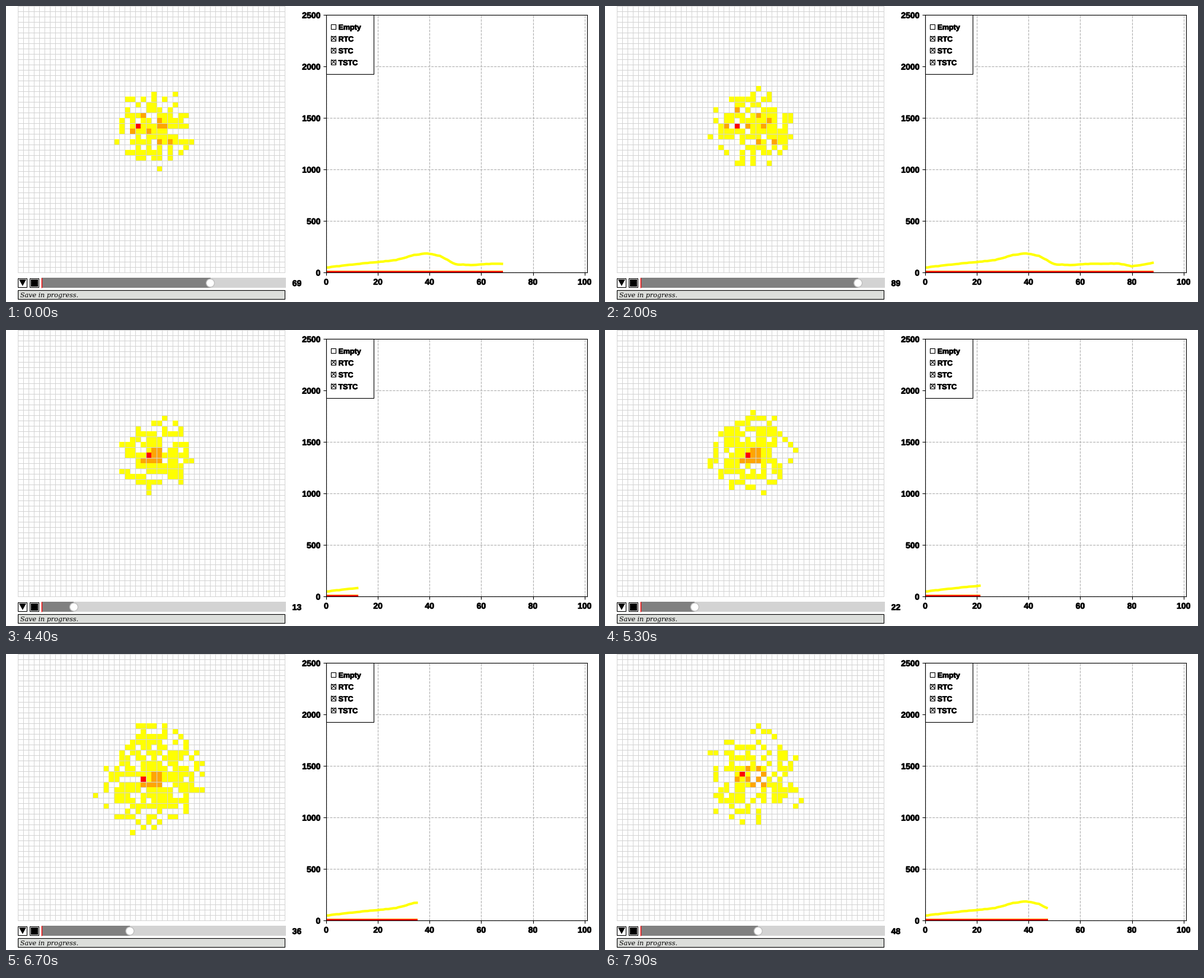
A matplotlib script that plays this animation: 1000 px wide and 500 px high, repeating every 8 s.

```python
import random

import matplotlib.pyplot as plt
import numpy as np
from matplotlib.animation import FuncAnimation
from matplotlib.patches import Circle, Polygon, Rectangle
from matplotlib.patheffects import withStroke

W, H, DPI = 1000, 500, 100
FRAMES, STEPS, FIRST = 80, 100, 69
GRID, CELL = 50, 9
PX = 72 / DPI

WHITE, LINE = (255, 255, 255), (211, 211, 211)
YELLOW, ORANGE, RED = (255, 255, 0), (255, 165, 0), (255, 0, 0)

# Turning points of the population: step -> cells
TREND = {0: 46, 12: 82, 27: 119, 34: 169, 39: 185, 44: 161, 50: 79,
         56: 71, 65: 84, 75: 86, 80: 58, 88: 92, 99: 104}

# Stem cells start packed around the root and drift apart
STEM_START = [(25, 22), (26, 22), (26, 23), (25, 23),
              (23, 24), (24, 24), (25, 24), (26, 24)]
STEM_END = [(22, 19), (26, 20), (28, 21), (27, 22),
            (20, 22), (24, 22), (26, 25), (29, 25)]

rng = random.Random(7)


def count_at(step):
    wobble = rng.uniform(-2, 2) if step else 2
    return round(np.interp(step, list(TREND), list(TREND.values())) + wobble)


def drift(start, end, step, begin, finish):
    t = min(max((step - begin) / (finish - begin), 0), 1)
    return tuple(round(a + (b - a) * t) for a, b in zip(start, end))


def stem_cells(step):
    return [drift(a, b, step, 30, 89) for a, b in zip(STEM_START, STEM_END)]


def root_cell(step):
    return drift((24, 23), (22, 22), step, 24, 58)


def neighbours(cell):
    c, r = cell
    return [(c + i, r + j) for i in (-1, 0, 1) for j in (-1, 0, 1) if i or j]


def grow():
    """Run the colony: cells migrate, divide and die along the trend."""
    fixed = set(stem_cells(0)) | {root_cell(0)}
    cells = {(c, r) for c in range(22, 30) for r in range(20, 26)}
    cells |= {(c, 26) for c in range(23, 31)} | {(30, 25)}
    cells -= fixed
    history = [sorted(cells)]

    for step in range(1, STEPS):
        fixed = set(stem_cells(step)) | {root_cell(step)}
        cells -= fixed
        goal = count_at(step)
        radius = 0.9 * goal ** 0.5
        middle = 23 - 2 * (step / STEPS) ** 4

        def distance(cell):
            return np.hypot(cell[0] - 25, cell[1] - middle) / radius

        def free_spot(cell):
            spots = [n for n in neighbours(cell) if n not in cells | fixed
                     and rng.random() > distance(n) ** 4]
            return rng.choice(spots) if spots else None

        for cell in rng.sample(sorted(cells), len(cells)):
            spot = free_spot(cell) if rng.random() < 0.6 else None
            if spot:
                cells.remove(cell)
                cells.add(spot)
        while len(cells) > goal - 5:
            pick = rng.choice(sorted(cells))
            if rng.random() < 0.15 + distance(pick) ** 3:
                cells.remove(pick)
        while len(cells) < goal:
            spot = free_spot(rng.choice(sorted(cells | fixed)))
            if spot:
                cells.add(spot)
        history.append(sorted(cells))
    return history


colony = grow()
counts = [len(cells) for cells in colony]

size = GRID * CELL + 1
board = np.full((size, size, 3), WHITE, dtype=np.uint8)
board[::CELL, :] = LINE
board[:, ::CELL] = LINE


def span(i):
    return slice(i * CELL + 1 - i % 2, i * CELL + CELL)


def board_at(step):
    img = board.copy()
    layers = ((colony[step], YELLOW), (stem_cells(step), ORANGE),
              ([root_cell(step)], RED))
    for cells, color in layers:
        for c, r in cells:
            img[span(r), span(c)] = color
    return img


fig = plt.figure(figsize=(W / DPI, H / DPI), dpi=DPI, facecolor="white")
heavy = dict(family="Liberation Sans", weight="bold",
             path_effects=[withStroke(linewidth=0.6, foreground="black")])

# Chart
chart = fig.add_axes([540 / W, 50 / H, 440 / W, 435 / H])
chart.set(xlim=(0, 101), ylim=(0, 2500),
          xticks=range(0, 101, 20), yticks=range(0, 2501, 500))
chart.grid(linestyle="--", color="#b0b0b0", linewidth=0.8)
chart.set_axisbelow(True)
for label in chart.get_xticklabels() + chart.get_yticklabels():
    label.set(fontsize=14 * PX, **heavy)
curves = [(chart.plot([], [], color=color, lw=3)[0], data) for color, data in (
    ("yellow", counts), ("orange", [8] * STEPS), ("red", [1] * STEPS))]

# Pixel-space layer for everything else
stage = fig.add_axes([0, 0, 1, 1], zorder=2)
stage.axis("off")
picture = stage.imshow(board, extent=(20, 20 + size, size, 0),
                       interpolation="nearest", aspect="auto")
stage.set(xlim=(0, W), ylim=(H, 0))


def box(x, y, w, h, face="white", edge="none", z=2):
    patch = Rectangle((x, y), w, h, fc=face, ec=edge, lw=0.8, zorder=z)
    return stage.add_patch(patch)


def segment(xs, ys, color="black", lw=0.8):
    stage.plot(xs, ys, color=color, lw=lw, zorder=4, scalex=False, scaley=False,
               solid_capstyle="butt")


# Legend
box(540, 15, 80, 100, edge="black")
for i, name in enumerate(("Empty", "RTC", "STC", "TSTC")):
    y = 35 + 20 * i
    box(548, y - 4, 8, 8, edge="black", z=3)
    if i:
        segment((548.5, 556.5), (y - 4.5, y + 3.5))
        segment((548.5, 556.5), (y + 3.5, y - 4.5))
    stage.text(560.5, y + 0.5, name, fontsize=12.5 * PX, va="center_baseline",
               zorder=4, **heavy)

# Buttons
box(20, 460, 15, 15, edge="black")
stage.add_patch(Polygon([(22, 462), (34, 462), (28, 473)], fc="black", lw=0, zorder=3))
box(40, 460, 15, 15, edge="black")
box(42, 462, 12, 12, face="black")

# Slider
box(60, 459, 412, 17, face="lightgray")
played = box(60, 459, 0, 17, face="gray", z=3)
segment((60, 60), (459, 476), color="red", lw=1)
knob = stage.add_patch(Circle((61, 468), 6.9, fc="white", ec="0.75", lw=1, zorder=5))
counter = stage.text(490.5, 467.5, "", fontsize=14 * PX, ha="center",
                     va="center_baseline", **heavy)

# Status bar
box(20, 480, 450, 15, face="#dcdedb", edge="black")
stage.text(24.5, 491.5, "Save in progress.", fontsize=8, style="italic",
           family="DejaVu Serif", va="baseline", zorder=4)


def draw(frame):
    step = (FIRST + frame) % STEPS
    picture.set_data(board_at(step))
    for line, data in curves:
        line.set_data(range(step), data[:step])
    x = 61 + 4.11 * step
    played.set_width(x - 60)
    knob.center = (x, 468)
    counter.set_text(str(step))
    return []


anim = FuncAnimation(fig, draw, frames=FRAMES, interval=100, repeat=True,
                     repeat_delay=0, init_func=lambda: draw(0))
plt.show()
```
